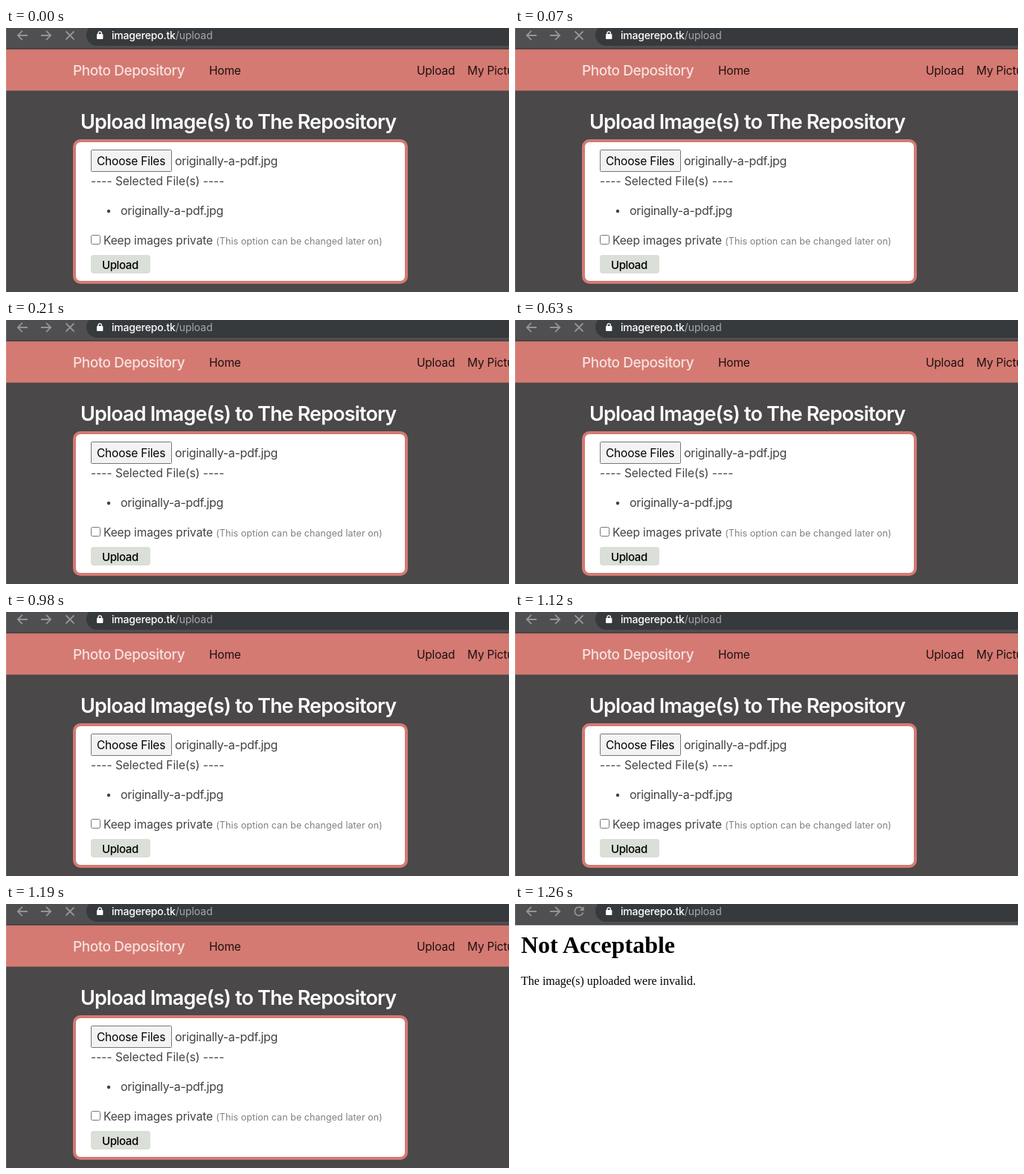
These frames come from a looping animation (676x356 px, 2240 ms). An HTML page:

```html
<!DOCTYPE html>
<html lang="en">
<head>
<meta charset="utf-8">
<title>Upload</title>
<style>
  html, body { margin: 0; width: 100%; height: 100%; overflow: hidden; background: #fff; }
  svg { display: block; }
  text { font: 15.5px Inter, sans-serif; font-optical-sizing: none; letter-spacing: -.13px; fill: #414244; white-space: pre; }
  .nav { letter-spacing: -.2px; fill: #1d1011; }
  .brand { font-size: 19px; font-weight: 500; letter-spacing: -.45px; fill: #f7e1df; }
  .title { font-size: 27px; font-weight: 600; letter-spacing: -.85px; fill: #fff; }
  .file { letter-spacing: -.32px; font-size: 16px; }
  .plain { letter-spacing: 0; }
  .hint { font-size: 12.5px; letter-spacing: .06px; fill: #7f8082; }
  .black { letter-spacing: -.2px; fill: #000; }
  .send { font-size: 15px; font-weight: 500; letter-spacing: -.4px; }
  .url { font-size: 14px; font-weight: 500; letter-spacing: -.2px; fill: #fff; }
  .url tspan { font-weight: 400; letter-spacing: -.05px; fill: #a6a8ab; }
  #error text { font: 16px "Liberation Serif", "Times New Roman", serif; letter-spacing: 0; fill: #000; }
  #error .head { font-size: 32px; font-weight: 700; }
  .icon { fill: none; stroke: #959596; stroke-width: 1.8; }
</style>
</head>
<body>
<svg width="676" height="356" viewBox="0 0 676 356">
  <g id="form">
    <rect width="676" height="356" fill="#4a4849"/>
    <rect y="28.5" width="676" height="56" fill="#d47a72"/>
    <text class="brand" x="90" y="64">Photo Depository</text>
    <text class="nav" x="273" y="63">Home</text>
    <text class="nav" x="552" y="63">Upload</text>
    <text class="nav" x="620" y="63">My Pictures</text>
    <text class="title" x="100" y="136">Upload Image(s) to The Repository</text>

    <rect x="92" y="152" width="446" height="191" rx="8" fill="#fff" stroke="#d47a72" stroke-width="4"/>
    <rect x="114.5" y="164.5" width="108" height="29" rx="1" fill="#f3f3f3" stroke="#777"/>
    <text class="black" x="122" y="185">Choose Files</text>
    <text class="file" x="227" y="185">originally-a-pdf.jpg</text>
    <text class="plain" x="114" y="212">---- Selected File(s) ----</text>
    <circle cx="138" cy="247" r="2.2" fill="#414244"/>
    <text class="file" x="154" y="252">originally-a-pdf.jpg</text>
    <rect x="114.5" y="279.5" width="12" height="12" rx="2" fill="#fff" stroke="#767676"/>
    <text x="131" y="292">Keep images private</text>
    <text class="hint" x="282.2" y="292">(This option can be changed later on)</text>
    <rect x="114" y="306" width="80" height="25" rx="4" fill="#dadfd7"/>
    <text class="black send" x="129" y="325">Upload</text>
    <rect width="1" height="356" fill="#fff" opacity=".15"/>
  </g>

  <g id="error">
    <rect width="676" height="356" fill="#fff"/>
    <text class="head" x="8" y="66">Not Acceptable</text>
    <text x="8" y="109">The image(s) uploaded were invalid.</text>
  </g>

  <!-- browser toolbar -->
  <rect width="676" height="28" fill="#4f4e50"/>
  <rect y="27.5" width="676" height="1" fill="#343334"/>
  <rect width="1" height="28" fill="#686768"/>
  <rect x="108" y="-5" width="600" height="29" rx="14.5" fill="#373a3d"/>
  <g class="icon">
    <path d="M29 10H16M22 3.8L15.8 10L22 16.2"/>
    <path d="M47 10H60M54 3.8L60.2 10L54 16.2"/>
    <path id="stop" d="M80.5 4.5L91.5 15.5M91.5 4.5L80.5 15.5"/>
    <g id="reload">
      <path d="M90.4 6A5.8 5.8 0 1 0 91.6 11.6"/>
      <path d="M92.7 3V9H86.7Z" fill="#959596" stroke="none"/>
    </g>
  </g>
  <rect x="122" y="8" width="8.4" height="7" rx="1" fill="#fff"/>
  <path d="M124 8.5V7a2.2 2.2 0 0 1 4.4 0V8.5" fill="none" stroke="#fff" stroke-width="1.3"/>
  <text class="url" x="142" y="15">imagerepo.tk<tspan>/upload</tspan></text>
</svg>
<script>
  const LOOP = 2240, REJECTED = 1260;
  const show = (id, on) => document.getElementById(id).style.display = on ? "" : "none";
  const start = performance.now();

  function draw() {
    const failed = (performance.now() - start) % LOOP >= REJECTED;
    show("form", !failed);
    show("stop", !failed);
    show("error", failed);
    show("reload", failed);
    requestAnimationFrame(draw);
  }
  draw();
</script>
</body>
</html>
```
